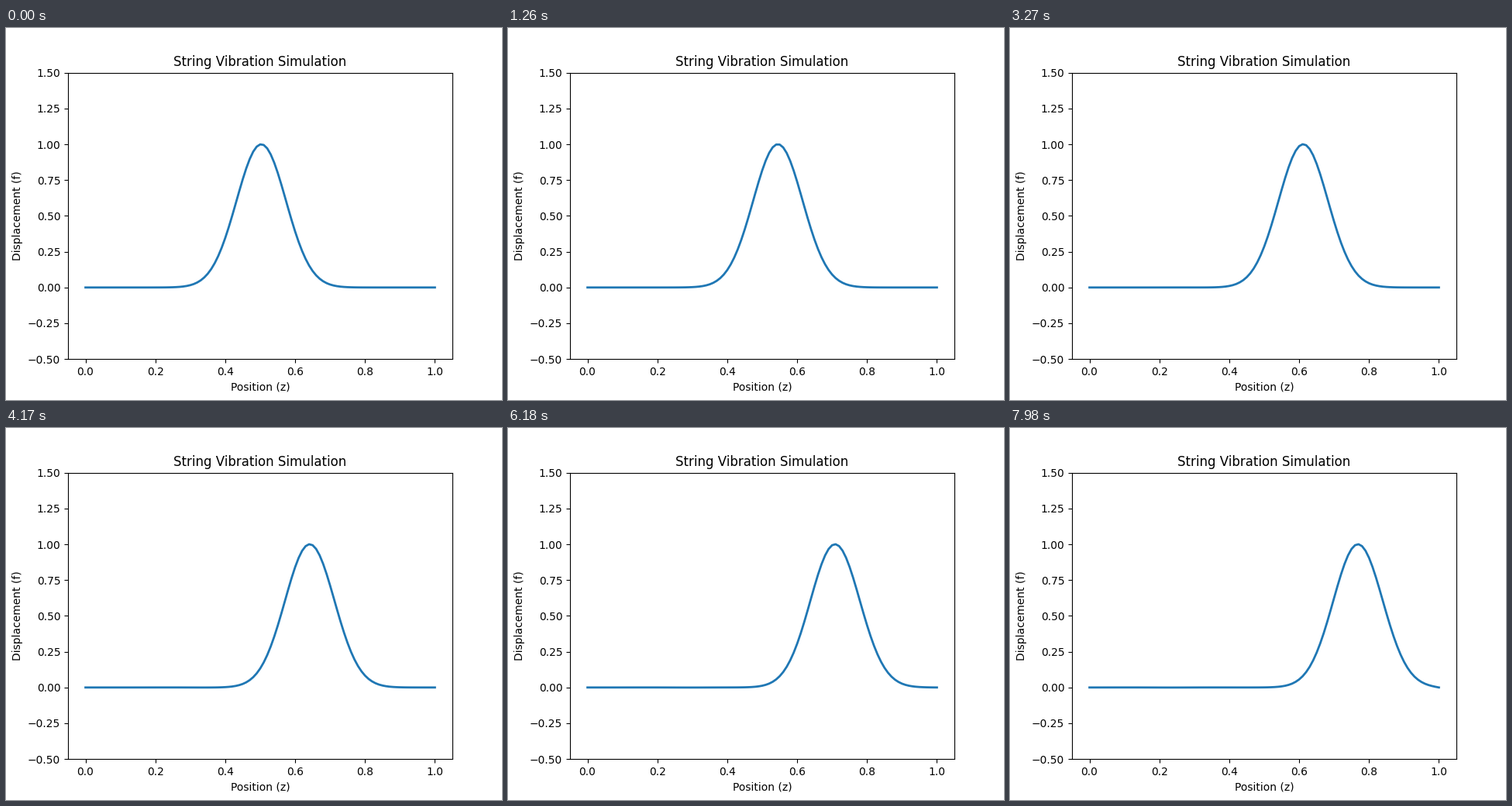
Animation, 640 px wide and 480 px high, one loop 8 s. Source, as a matplotlib script:

```python
import numpy as np
import matplotlib.pyplot as plt
from matplotlib.animation import FuncAnimation

LOOP_MS = 8000
FRAMES = 267
POINTS = 101
COURANT = 0.1      # wave speed * dt / dz
FIRST_STEP = 3     # time step shown at the start of the loop

z = np.linspace(0, 1, POINTS)
shift = COURANT * (z[1] - z[0])


def pulse(center):
    return np.exp(-100 * (z - center) ** 2)


def simulate(steps):
    """Leapfrog solution of the wave equation with fixed ends."""
    history = [pulse(0.5), pulse(0.5 + shift)]
    while len(history) < steps:
        before, now = history[-2:]
        after = np.zeros(POINTS)
        bend = now[2:] - 2 * now[1:-1] + now[:-2]
        after[1:-1] = 2 * now[1:-1] - before[1:-1] + COURANT ** 2 * bend
        history.append(after)
    return history


waves = simulate(FIRST_STEP + FRAMES)

fig, ax = plt.subplots(figsize=(6.4, 4.8), dpi=100)
line, = ax.plot(z, waves[FIRST_STEP], lw=2)
ax.set_ylim(-0.5, 1.5)
ax.set_title("String Vibration Simulation")
ax.set_xlabel("Position (z)")
ax.set_ylabel("Displacement (f)")


def update(i):
    line.set_ydata(waves[FIRST_STEP + i])
    return line,


anim = FuncAnimation(fig, update, frames=FRAMES, interval=LOOP_MS / FRAMES,
                     repeat=True, repeat_delay=0)
plt.show()
```
